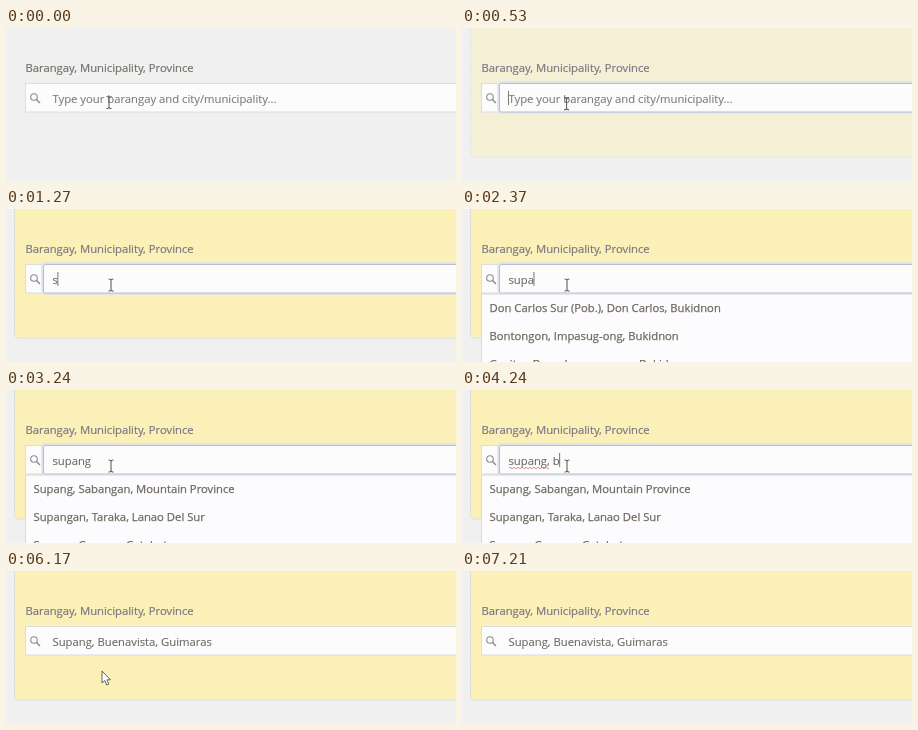
Write an HTML page that moves like this. It is 450 px wide and 153 px high and loops after 7400 ms.

```html
<!DOCTYPE html>
<html lang="en">
<meta charset="utf-8">
<title>Address lookup</title>
<style>
  html, body { margin: 0; height: 100%; overflow: hidden; background: #f0f0f0; }
  svg { display: block; width: 100vw; height: 100vh; }
  text { font: 11.27px "Open Sans", "Noto Sans", sans-serif; white-space: pre; stroke: currentColor; fill: currentColor; stroke-width: .12; color: #686862; }
  #label { stroke-width: .22; }
  #list text { color: #6f685d; stroke-width: .25; }
</style>
<svg viewBox="0 0 450 153">
  <rect width="450" height="153" fill="#f0f0f0"/>
  <rect id="panel" x="8.5" y="-10" width="460" height="139" rx="3" fill="#fbf0b8" stroke="#d2d8dc" stroke-dasharray="2 1"/>
  <text id="label" x="19.5" y="44">Barangay, Municipality, Province</text>
  <rect x="19.5" y="55.5" width="440" height="28.5" fill="#fcfcfd" stroke="#dcdce4"/>
  <g fill="none" stroke="#8d8d90" stroke-width="1.1">
    <circle cx="28" cy="69" r="3.3"/>
    <path d="M30.5 71.5L34 75" stroke-width="1.5"/>
  </g>
  <g id="focus" fill="none">
    <rect x="36.5" y="54.5" width="430" height="30" rx="3" stroke="#dde2ee" stroke-width="2.5"/>
    <rect x="37.5" y="55.5" width="430" height="28.5" rx="2" fill="#fcfcfd" stroke="#b9bdcd"/>
  </g>
  <text id="entry" x="46.5" y="75"></text>
  <path id="squiggle" fill="none" stroke="#c58b76" stroke-width=".9"/>
  <path id="caret" stroke="#77776f"/>
  <g id="list">
    <rect id="sheet" x="19.5" y="85" width="440" fill="#fcfcfe" stroke="#d5d9e2"/>
    <text x="27.5" y="103"></text>
    <text x="27.5" y="131"></text>
    <text x="27.5" y="159"></text>
  </g>
  <path id="beam" d="M-2.5 -6Q0 -6 0 -4.5Q0 -6 2.5 -6M0 -5V5M-2.5 6Q0 6 0 4.5Q0 6 2.5 6" fill="none" stroke="#605f5a" stroke-width="1.1"/>
  <path id="arrow" d="M0 0V12L2.8 9.5L4.7 14L6.8 13.1L4.9 8.8H8.5Z" fill="#fff" stroke="#66645c"/>
</svg>
<script>
const $ = id => document.getElementById(id);
const LOOP = 7400, FOCUS = 350, PICK = 5670, LEAVE = 7200;
const QUERY = 'supang, buena', CHOICE = 'Supang, Buenavista, Guimaras';
const PROMPT = 'Type your barangay and city/municipality...';
const keys = [1150, 1350, 1550, 1950, 2500, 2650, 3400, 3620, 4180, 4340, 4500, 4660, 4850];
const results = [
  [1800, ['Don Carlos Sur (Pob.), Don Carlos, Bukidnon', 'Bontongon, Impasug-ong, Bukidnon', 'Capitan Bayo, Impasug-ong, Bukidnon']],
  [3000, ['Supang, Sabangan, Mountain Province', 'Supangan, Taraka, Lanao Del Sur', 'Supang, Carmen, Cotabato']],
  [4700, [CHOICE]]
];
const rows = document.querySelectorAll('#list text');
const show = (id, on) => $(id).setAttribute('visibility', on ? 'visible' : 'hidden');
const ramp = (t, a, b) => Math.min(1, Math.max(0, (t - a) / (b - a)));
const smooth = p => p * p * (3 - 2 * p);

let wave = 'M47 78';
for (let x = 47; x < 84; x += 4) wave += 'q1 -1.5 2 0t2 0';
$('squiggle').setAttribute('d', wave);

function drawField(t) {
  const active = t >= FOCUS && t < PICK;
  const typed = keys.filter(k => k <= t).length;
  $('panel').setAttribute('opacity', ramp(t, 300, 800));
  $('label').style.color = t < FOCUS ? '#77736b' : '#7b7885';
  const entry = $('entry');
  entry.textContent = t >= PICK ? CHOICE : QUERY.slice(0, typed) || PROMPT;
  entry.style.color = typed ? '#686862' : '#7b7b77';
  show('focus', active);
  show('squiggle', active && typed > 6);
  const since = t - (typed ? keys[typed - 1] : FOCUS);
  show('caret', active && since % 1060 < 530);
  const x = 46.5 + (typed ? entry.getComputedTextLength() : 0);
  $('caret').setAttribute('d', `M${x} 63V77`);
}

function drawList(t) {
  const current = results.filter(r => r[0] <= t).pop();
  const open = current && t < PICK;
  show('list', open);
  if (!open) return;
  $('sheet').setAttribute('height', 28 * current[1].length);
  rows.forEach((row, i) => row.textContent = current[1][i] || '');
}

function drawPointer(t) {
  const settle = ramp(t, 300, 600);
  const down = smooth(ramp(t, 5050, 5450)), out = ramp(t, 6700, 7170) ** 2;
  const x = 103 + 2 * settle - 9 * down + 294 * out;
  const y = 74.5 + 1.5 * settle + 24 * down + out;
  const arrow = y > 85;
  for (const id of ['beam', 'arrow']) $(id).setAttribute('transform', `translate(${x} ${y})`);
  show('beam', !arrow);
  show('arrow', arrow && t < LEAVE);
}

function frame(now) {
  const t = now % LOOP;
  drawField(t);
  drawList(t);
  drawPointer(t);
  requestAnimationFrame(frame);
}
frame(performance.now());
</script>
</html>
```
